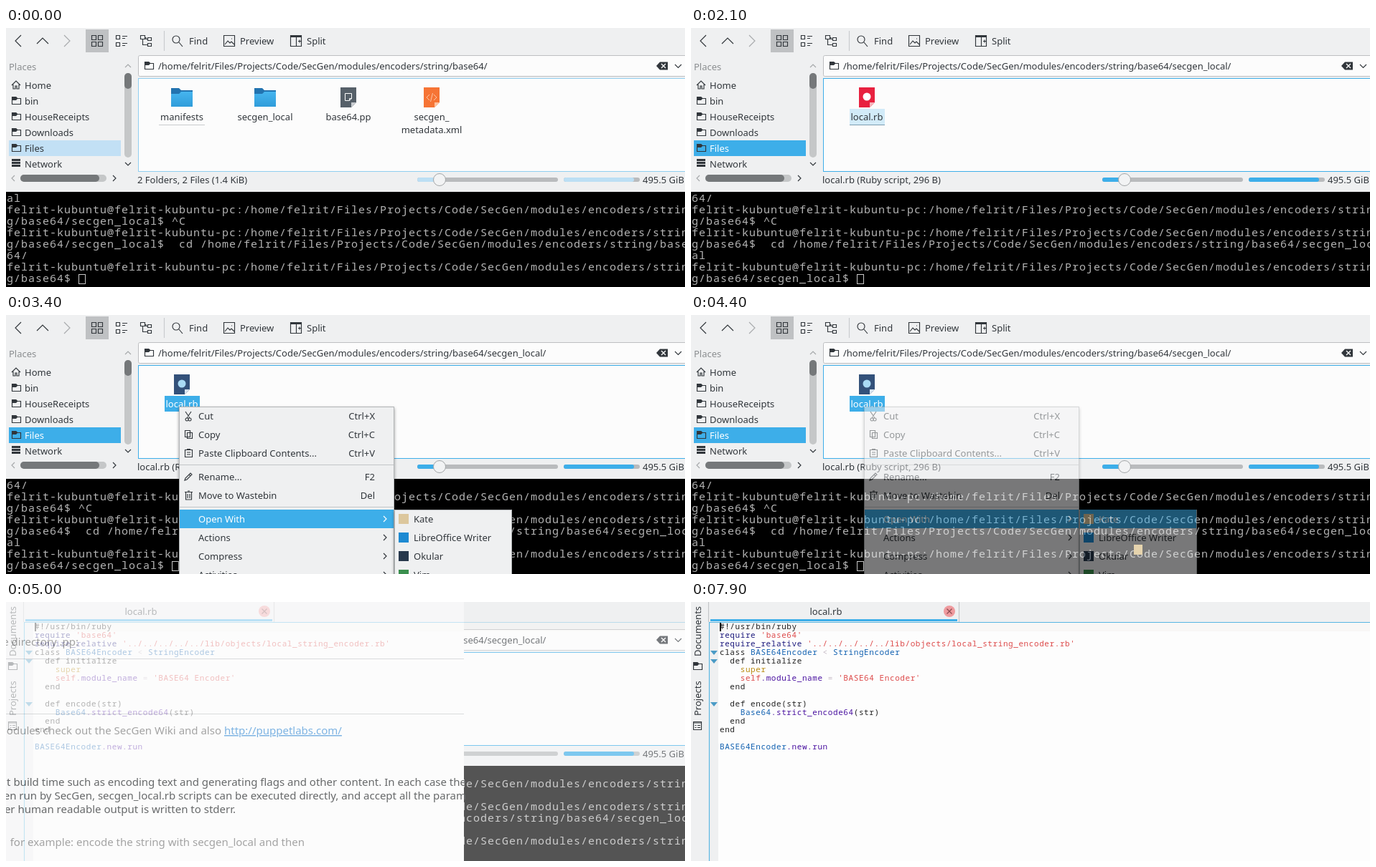
Animation of 946x362 px, one loop 8000 ms. Source, as an HTML page:

```html
<!DOCTYPE html>
<html lang="en">
<head>
<meta charset="utf-8">
<title>File manager</title>
<style>
html, body { margin: 0; width: 100%; height: 100%; overflow: hidden; background: #eff0f1; }
svg { display: block; width: 946px; height: 362px; --hl: #c2e0f5; --edge: #90cef0; --fill: #bcdff4; --sel: #31363b; }
svg.active { --hl: #3daee9; --edge: #3daee9; --fill: #3daee9; --sel: #fff; }
text { font: 13px "Noto Sans", sans-serif; fill: #31363b; white-space: pre; }
.term text { font: 15px "Noto Sans Mono", monospace; letter-spacing: 1px; fill: #b4b4b4; }
.code text { font: 11px "Noto Sans Mono", monospace; letter-spacing: .58px; fill: #222; }
.page text { font-size: 15px; fill: #1c1f21; }
.line { fill: none; stroke: #31363b; stroke-width: 1.15; }
.sel text { fill: var(--sel); }
.row > rect:first-child { fill: #3daee9; visibility: hidden; }
.row.on > rect:first-child { visibility: visible; }
.row.on text { fill: #fff; }
.row.on .line { stroke: #fff; }
.menu { filter: drop-shadow(0 2px 2px #0006); }
</style>
</head>
<body>
<svg id="stage" viewBox="0 0 946 362"></svg>
<script>
const LOOP = 8000, COLS = 95, CELL = 10;
const stage = document.getElementById('stage');
const esc = s => s.replace(/&/g, '&amp;').replace(/</g, '&lt;');
const text = (x, y, s, more = '') => `<text x="${x}" y="${y}" ${more}>${esc(s)}</text>`;
const rect = (x, y, w, h, fill, more = '') => `<rect x="${x}" y="${y}" width="${w}" height="${h}" fill="${fill}" ${more}/>`;
const line = (d, more = '') => `<path class="line" d="${d}" ${more}/>`;
const group = (id, body, more = '') => `<g id="${id}" ${more}>${body}</g>`;
const mid = 'text-anchor="middle"', end = 'text-anchor="end"';

const base = '/home/felrit/Files/Projects/Code/SecGen/modules/encoders/string/base64';
const local = base + '/secgen_local';

// Toolbar
function toolbar() {
  const squares = [[119.5, 10.5], [128.5, 10.5], [119.5, 19.5], [128.5, 19.5]]
    .map(([x, y]) => line(`M${x} ${y}h6v6h-6z`)).join('');
  return line('M21 10l-8 8 8 8M43 22l8-8 8 8') +
    line('M81 10l8 8-8 8', 'style="stroke:#a9abad"') +
    rect(111, 2, 32, 32, '#bfc1c3') + squares +
    line('M153.5 10.5h5v5h-5zM153.5 20.5h5v5h-5zM162 11.5h7M162 14.5h4M162 21.5h7M162 24.5h4') +
    line('M187.5 10.5h6v5h-6zM197.5 13.5h5v4h-5zM197.5 21.5h5v4h-5zM190.5 16v7.5h7M193 13.5h2v2h3') +
    line('M220.5 4V32', 'style="stroke:#c9cbcd"') +
    '<circle class="line" cx="237" cy="16" r="5"/>' + line('M241 20l5 6') +
    line('M303.5 10.5h15v15h-15zM305 23l4-5 3 3 2-2 4 4M314 15h1') +
    line('M396.5 10.5h15v15h-15zM404.5 11v14M407 18.5h4M409 16.5v4') +
    rect(396, 10, 16, 3, '#31363b') +
    text(255, 23, 'Find') + text(326, 23, 'Preview') + text(419, 23, 'Split');
}

function folderGlyph(x, y) {
  return line(`M${x + .5} ${y + .5}h5l2 2h5v8h-12z`) +
    `<path d="M${x} ${y}h6l2 2h5v1h-5l-2 2h-6z" fill="#31363b"/>`;
}

function places() {
  const rows = ['Home', 'bin', 'HouseReceipts', 'Downloads', 'Files', 'Network'];
  const items = rows.map((name, i) => {
    const y = 80 + i * 22;
    const icon = i === 0 ? line(`M8 ${y}l6-6 6 6M10 ${y - 1}v6h3v-4h2v4h3v-6`)
      : i === 5 ? line(`M8 ${y - 5.5}h12M8 ${y - 1.5}h12M8 ${y + 2.5}h12`, 'style="stroke-width:3"')
      : folderGlyph(8, y - 6);
    return `<g ${i === 4 ? 'class="sel"' : ''}>` +
      (i === 4 ? rect(4, 157, 156, 22, 'var(--hl)') : '') + icon + text(26, y + 5, name) + '</g>';
  }).join('');
  return text(4, 59, 'Places', 'style="fill:#8b8e90"') + items +
    rect(165, 63, 10, 118, '#c5c7c8', 'rx="5"') + rect(165, 63, 10, 22, '#75787a', 'rx="5"') +
    rect(20, 205, 120, 10, '#c5c7c8', 'rx="5"') + rect(20, 205, 110, 10, '#75787a', 'rx="5"') +
    line('M166 55l4-4 4 4M12 206l-4 4 4 4', 'style="stroke:#a5a8aa"') +
    line('M166 188l4 4 4-4M149 206l4 4-4 4');
}

// File icons and labels
function folder(cx, name) {
  return `<path d="M${cx - 15} 84h11l3 3h16v22h-30z" fill="#2273b0"/>` +
    `<path d="M${cx - 15} 92h11l3-3h16v21h-30z" fill="url(#sky)"/>` + text(cx, 129, name, mid);
}
function sheet(cx, fill, mark, corner) {
  const x = cx - 11;
  return `<path d="M${x} 83h22v21l-7 7h-15z" fill="${fill}"/>` +
    `<path d="M${x + 15} 111v-7h7z" fill="${corner}"/>` + mark;
}
const dot = fill => `<circle cx="245" cy="96" r="5.5" fill="${fill}"/>`;

function views() {
  const sky = '<linearGradient id="sky" x2="0" y2="1"><stop stop-color="#46b5ef"/><stop offset="1" stop-color="#2f9cda"/></linearGradient>';
  const parent = sky + rect(213, 135, 64, 1, '#c9cbcd') +
    rect(321, 113, 79, 22, '#3daee9', 'id="hover1"') +
    folder(245, 'manifests') + folder(361, 'secgen_local') +
    sheet(477, '#566069', '<path d="M472.5 91.5h9v7l-3 3h-6zM478.5 101v-2.500h3" fill="none" stroke="#fff"/>', '#c8ccd0') +
    text(477, 129, 'base64.pp', mid) +
    sheet(593, '#f67435', '<path d="M590 93l-4 4 4 4M596 93l4 4-4 4M594.500 91l-3 12" fill="none" stroke="#fcc7a8"/>', '#ffc29f') +
    text(593, 129, 'secgen_', mid) + text(593, 147, 'metadata.xml', mid);
  const plain = rect(221, 135, 49, 1, '#7d9db0') + rect(221, 113, 49, 22, '#3daee9', 'id="hover2"') +
    sheet(245, '#e8213f', dot('#fff'), '#f7b3bb') + text(245, 129, 'local.rb', mid);
  const picked = rect(221, 113, 49, 22, '#3daee9') + sheet(245, '#33517a', dot('#a9daf5'), '#d9e4f0') +
    text(245, 129, 'local.rb', mid + ' style="fill:#fff"');
  return group('parent', parent) + group('child', group('plain', plain) + group('picked', picked));
}

function manager() {
  return rect(0, 0, 946, 229, '#eff0f1') + toolbar() + places() +
    rect(184.5, 38.5, 765, 29, '#fcfcfc', 'stroke="#bdbfc1" rx="2"') + folderGlyph(193, 47) +
    text(212, 58, '', 'id="path"') +
    '<path d="M906 53l5-5.5h11v11h-11z" fill="#31363b"/>' +
    '<path d="M913 50l6 6M919 50l-6 6" stroke="#fcfcfc" stroke-width="1.4"/>' + line('M932 51l4.5 4.5 4.5-4.5') +
    rect(184.5, 70.5, 765, 130, '#fcfcfc', 'style="stroke:var(--edge)"') + views() +
    text(183, 217, '', 'id="status"') +
    rect(573, 209, 196, 6, '#b9bbbd', 'rx="3"') + rect(573, 209, 34, 6, 'var(--fill)', 'rx="3"') +
    '<circle cx="604" cy="212" r="8.5" fill="#f2f3f4" stroke="#a3a6a8"/>' +
    rect(777, 209, 106, 6, '#b9bbbd', 'rx="3"') + rect(777, 209, 98, 6, 'var(--fill)', 'rx="3"') +
    text(887, 217, '495.5 GiB');
}

// Context menu
const entries = [
  ['Cut', 141, 'Ctrl+X', 'M250 135l6 9M258 135l-6 9M252 144a2 2 0 1 0 .1 0M256 144a2 2 0 1 0 .1 0'],
  ['Copy', 167, 'Ctrl+C', 'M249.5 161.5h7v9h-7zM252.5 164.5h7v8h-7z'],
  ['Paste Clipboard Contents...', 193, 'Ctrl+V', 'M249.5 188.5h10v10h-10zM252 187.5h5M252 192h5M252 195h5'],
  ['Rename...', 226, 'F2', 'M249 231l1-3 7-7 2 2-7 7zM255 223l2 2'],
  ['Move to Wastebin', 252, 'Del', 'M249 247.5h11M250.5 248v10h8v-10M253 246h3M253 250v6M256 250v6'],
  ['Open With', 285], ['Actions', 311], ['Compress', 337], ['Activities', 363]
];
const apps = [['Kate', '#dcc79d'], ['LibreOffice Writer', '#1d8ad2'], ['Okular', '#27384c'], ['Vim', '#3b8f4e']];

function menus() {
  const rows = entries.map(([name, y, key, icon]) =>
    `<g class="row main">${rect(242, y - 13, 298, 26, '')}${icon ? line(icon) : line(`M526 ${y - 4}l4 4-4 4`)}` +
    text(268, y + 5, name) + (key ? text(514, y + 5, key, end) : '') + '</g>').join('');
  const subs = apps.map(([name, fill], i) => {
    const y = 285 + 26 * i;
    return `<g class="row sub">${rect(542, y - 13, 162, 26, '')}${rect(547, y - 7, 14, 14, fill)}${text(568, y + 5, name)}</g>`;
  }).join('');
  const panel = (x, y, w) => rect(x + .5, y + .5, w - 1, 262, '#eff0f1', 'stroke="#b2b5b7"');
  return group('menu', panel(241, 128, 300) + rows +
    line('M242 209.5h298M242 268.5h298', 'style="stroke:#c3c5c7"'), 'class="menu"') +
    group('submenu', panel(541, 272, 164) + subs, 'class="menu"') +
    rect(617, 321, 12, 14, '#e5d3ad', 'id="launch"');
}

function page() {
  const grey = ' style="fill:#777"';
  return rect(0, 0, 638, 362, '#fcfcfc') +
    line('M0 79.5H638M0 156.5H638', 'style="stroke:#c8cacc"') +
    text(101, 61, 'In the module directory .pp:', end + grey) +
    text(300, 185, 'For more on modules check out the SecGen Wiki and also', end + grey) +
    text(304, 185, 'http://puppetlabs.com/', 'style="fill:#3d8fd6;text-decoration:underline"') +
    text(641, 257, 'at build time such as encoding text and generating flags and other content. In each case the', end) +
    text(641, 276, 'When run by SecGen, secgen_local.rb scripts can be executed directly, and accept all the param', end) +
    text(320, 295, 'any other human readable output is written to stderr.', end) +
    text(416, 341, 'for example: encode the string with secgen_local and then', end + grey);
}

// Editor: each row is a list of [colour, text] runs
const ink = '#222', navy = '#1d1a7d', red = '#dd4b4b', blue = '#1060b0', plum = '#4a12a0', gold = '#b98a10', pale = '#c4b8c4';
const source = [
  [[ink, '#!/usr/bin/ruby']],
  [[navy, 'require '], [red, "'base64'"]],
  [[navy, 'require_relative '], [red, "'../../../../../lib/objects/local_string_encoder.rb'"]],
  [[ink, 'class '], [blue, 'BASE64Encoder'], [pale, ' < '], [blue, 'StringEncoder']],
  [[ink, '  def initialize']],
  [[gold, '    super']],
  [[red, '    self'], [plum, '.module_name'], [pale, ' = '], [red, "'BASE64 Encoder'"]],
  [[ink, '  end']],
  [],
  [[ink, '  def encode(str)']],
  [[blue, '    Base64'], [plum, '.strict_encode64'], [ink, '(str)']],
  [[ink, '  end']],
  [[ink, 'end']],
  [],
  [[blue, 'BASE64Encoder'], [plum, '.new.run']]
];

function editor() {
  const rows = source.map((runs, i) => `<text x="40" y="${38 + 12 * i}">` +
    runs.map(([c, s]) => `<tspan style="fill:${c}">${esc(s)}</tspan>`).join('') + '</text>').join('');
  const folds = [71, 83, 143].map(y => `<path d="M27 ${y - 3}h10l-5 6z" fill="#4b9bc6"/>`).join('');
  const side = (y, s) => `<text transform="translate(14 ${y}) rotate(-90)">${s}</text>`;
  return rect(0, 0, 946, 362, '#eff0f1') +
    side(76, 'Documents') + side(159, 'Projects') + folderGlyph(3, 84) +
    line('M3.5 167.5h11v11h-11zM3.5 169h11M5.5 172.5h2M9 172.5h4M5.5 175.5h2M9 175.5h4') +
    line('M24.5 0V28M373.5 0V28', 'style="stroke:#c3c5c7"') +
    rect(27, 24, 344, 3, '#3daee9') + text(188, 18, 'local.rb', mid) +
    '<circle cx="360" cy="13" r="8" fill="#ef9a9e"/>' +
    line('M356.5 9.5l7 7M363.5 9.5l-7 7', 'style="stroke:#8a4a4f"') +
    rect(38, 29, 908, 333, '#fdfdfd') + rect(38, 29, 908, 12, '#f8f7f6') +
    line('M25.5 362V28.5H946', 'style="stroke:#57b5e2"') + folds +
    `<g class="code">${rows}</g>` + rect(40, 29, 2, 12, '#111', 'id="caret"');
}

// Terminal
const prompt = dir => `felrit-kubuntu@felrit-kubuntu-pc:${dir}$ `;
const log = [
  prompt(base) + ' cd ' + local,
  prompt(local) + '^C',
  prompt(local) + ' cd ' + base + '/',
  prompt(base) + '^C',
  prompt(base) + ' cd ' + local
];
function wrap(count, last) {
  const out = [];
  for (const s of [...log.slice(0, count), last])
    for (let i = 0; i < s.length; i += COLS) out.push(s.slice(i, i + COLS));
  return out.slice(-8);
}
function terminal(count, last) {
  const rows = wrap(count, last);
  return rows.map((s, i) => text(1, 243 + 16 * i, s)).join('') +
    rect(rows[7].length * CELL + 1.5, 344.5, 9, 13, 'none', 'stroke="#c8c8c8"');
}

stage.innerHTML = manager() + rect(0, 229, 946, 133, '#000') +
  group('term0', terminal(3, prompt(base)), 'class="term"') +
  group('term1', terminal(4, prompt(base)), 'class="term"') +
  group('term2', terminal(5, prompt(local)), 'class="term"') +
  menus() + group('page', page(), 'class="page"') + group('editor', editor());

const el = id => document.getElementById(id);
const fade = (id, a) => {
  el(id).style.opacity = a;
  el(id).style.display = a > 0 ? '' : 'none';
};
const mainRows = [...document.querySelectorAll('.main')];
const subRows = [...document.querySelectorAll('.sub')];
const light = (rows, n) => rows.forEach((r, i) => r.classList.toggle('on', i === n));
const ramp = (k, from, steps) => Math.max(0, Math.min(1, (k - from + 1) / steps));

// k counts tenths of a second
function draw(ms) {
  const k = Math.floor(ms % LOOP / 100);
  const inside = k >= 11;
  stage.classList.toggle('active', inside);
  fade('parent', +!inside);
  fade('child', +inside);
  el('path').textContent = (inside ? local : base) + '/';
  el('status').textContent = k < 5 ? '2 Folders, 2 Files (1.4 KiB)' : k < 11 ? 'secgen_local (Folder)'
    : k < 19 ? '1 File (296 B)' : 'local.rb (Ruby script, 296 B)';
  fade('hover1', .22 * ramp(k, 5, 3));
  fade('hover2', .22 * ramp(k, 19, 3));
  fade('plain', +(k < 24));
  fade('picked', +(k >= 24));
  const step = k < 12 ? 0 : k < 13 ? 1 : 2;
  for (let i = 0; i < 3; i++) fade('term' + i, +(i === step));

  const out = k < 44 ? 1 : k < 48 ? .5 ** (k - 43) : 0;
  fade('menu', ramp(k, 24, 2) * out);
  fade('submenu', ramp(k, 33, 2) * out);
  fade('launch', +(k === 44 || k === 45));
  light(mainRows, k < 26 ? -1 : k < 27 ? 0 : k < 28 ? 2 : k < 31 ? k - 25 : k < 33 ? 6 : 5);
  light(subRows, k < 35 ? -1 : k < 37 ? 1 : 0);

  fade('page', k < 46 ? 0 : k < 47 ? .15 : k < 48 ? .4 : 1);
  fade('editor', ramp(k, 50, 3));
  const off = k >= 55 && k < 60 || k >= 65 && k < 69 || k >= 74 && k < 79;
  fade('caret', +!off);
}

const start = performance.now();
function tick() {
  draw(performance.now() - start);
  requestAnimationFrame(tick);
}
tick();
</script>
</body>
</html>
```
